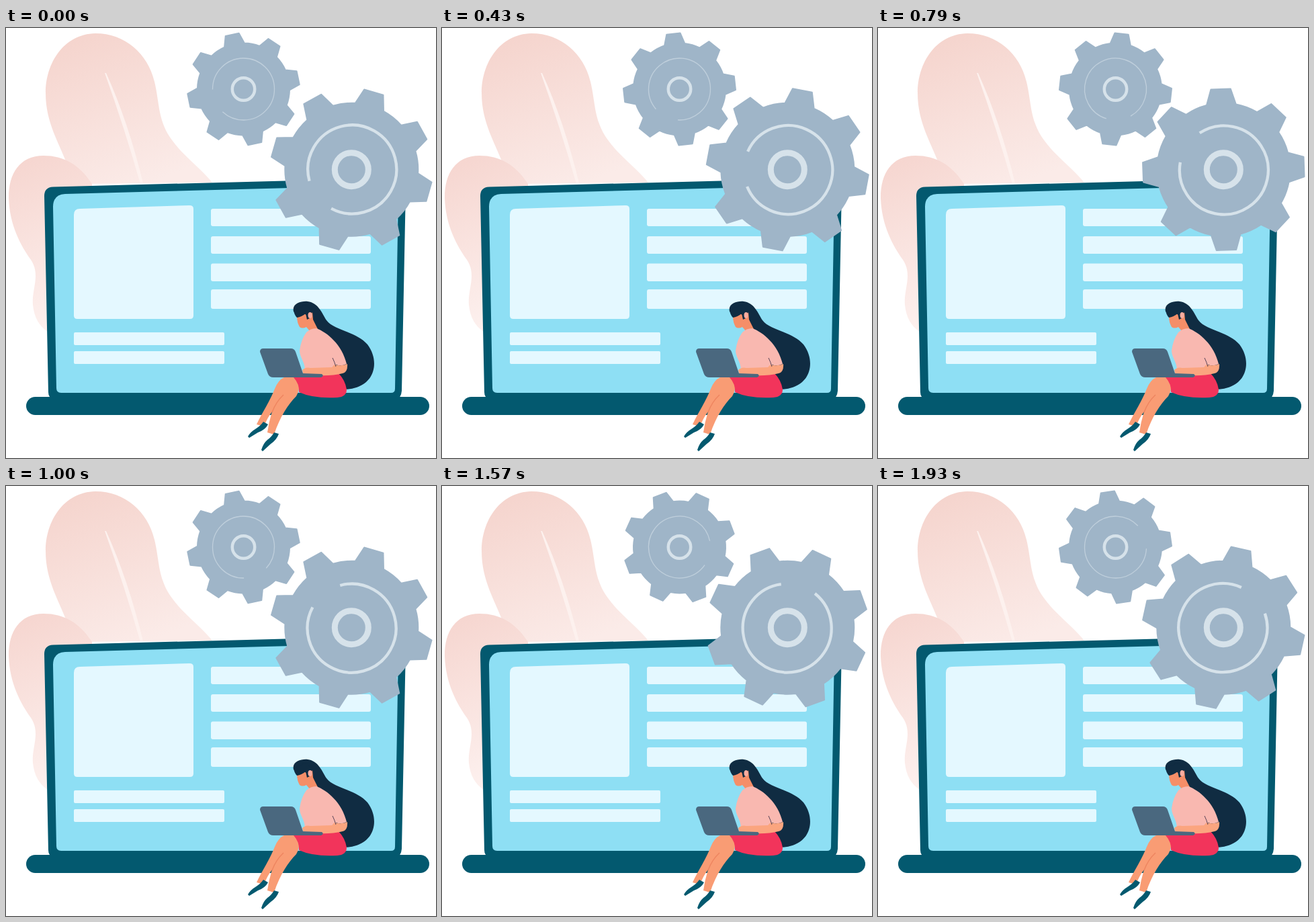
An HTML page for the animation above (2 s loop, 640 by 640 pixels).

```html
<!DOCTYPE html>
<html lang="en">
<head>
<meta charset="utf-8">
<title>Laptop and gears</title>
<style>
html, body { margin: 0; width: 100%; height: 100%; overflow: hidden; background: #fff; }
svg { display: block; width: 100vw; height: 100vh; }
.tooth { fill: #9fb5c8; stroke: #9fb5c8; stroke-linejoin: round; }
.ring { fill: none; stroke: #d6e2ea; }
</style>
</head>
<body>
<svg viewBox="0 0 640 640">
  <defs>
    <linearGradient id="tall" x1="0.2" y1="0" x2="0.6" y2="1">
      <stop offset="0" stop-color="#f5d4cd"/><stop offset="1" stop-color="#fbebe8"/>
    </linearGradient>
    <linearGradient id="low" x1="0.3" y1="0" x2="0.5" y2="1">
      <stop offset="0" stop-color="#f6d6d0"/><stop offset="1" stop-color="#fdf1ef"/>
    </linearGradient>
  </defs>

  <!-- leaves -->
  <path fill="url(#tall)" d="M307 230C288 206 262 190 243 161C226 134 228 108 221 80C211 38 177 8 133 8C86 9 59 52 59 97C59 142 80 172 92 206L122 232Z"/>
  <path fill="#fdf1ee" d="M147 67L149 67Q182 140 204 231L200 232Q176 148 147 67Z"/>
  <path fill="url(#low)" d="M128 232C109 203 86 190 56 190C20 190 4 217 4 252C5 293 22 324 37 345C52 368 38 388 40 412C42 431 49 443 62 452L130 440Z"/>

  <!-- big laptop -->
  <path fill="#03596f" d="M57 250Q57 237 70 236.5L582 223Q596 222 595 238L589 540Q588 552 580 552H72Q63 552 63 542Z"/>
  <rect x="30" y="549" width="600" height="27" rx="13.5" fill="#03596f"/>
  <path fill="#8edff4" d="M70 266Q70 248 88 247L574 234Q585 233 584 246L579 537Q579 543 573 543H82Q75 543 75 536Z"/>
  <g fill="#e4f8ff">
    <path d="M101 278Q101 269 110 269L273 264Q279 264 279 269V428Q279 433 274 433H106Q101 433 101 428Z"/>
    <rect x="305" y="269" width="238" height="26" rx="3"/>
    <rect x="305" y="310" width="238" height="26" rx="3"/>
    <rect x="305" y="350.5" width="238" height="26.5" rx="3"/>
    <rect x="305" y="389" width="238" height="29" rx="3"/>
    <rect x="101" y="453" width="224" height="19" rx="2"/>
    <rect x="101" y="481" width="224" height="19" rx="2"/>
  </g>

  <!-- woman -->
  <path fill="#102c42" d="M428 422C425 410 440 406 449 407C465 409 470 424 477 435C488 450 522 452 538 471C553 491 550 515 536 527C526 535 514 538 503 538L484 505L458 448L442 430Z"/>
  <path fill="#f58e68" d="M433 429L442 424L447 427L450 432L456 423L457 434L464 448L454 453L447 445Q441 448 437 445Q433 438 433 429Z"/>
  <path fill="#102c42" d="M428 420L446 412L456 421L452 432L448 434L446 425Q440 430 433 431Q429 427 428 420Z"/>
  <ellipse cx="452.5" cy="427.5" rx="3" ry="4.5" fill="#f9aca0"/>
  <path fill="#f99c74" d="M430 520L414 520Q405 524 400 537C393 555 381 573 373 590L384 593Q389 580 396 571Q391 587 389 602L399 605C408 578 420 560 432 548Q438 538 436 522Z"/>
  <path fill="none" stroke="#ee8560" stroke-width="1.5" d="M396 572Q402 556 413 546"/>
  <path fill="#03596f" d="M360 608Q364 601 371 597Q379 592 383 586L390 590Q386 598 375 602L362 610Z"/>
  <path fill="#03596f" d="M380 628Q383 618 389 613Q395 609 399 602L406 604Q403 613 394 619L382 630Z"/>
  <path fill="#f2345b" d="M428 520Q450 510 494 513Q505 524 507 538Q507 549 493 550Q458 552 436 542Q437 530 428 520Z"/>
  <path fill="#f9b8b0" d="M447 453Q453 447 462 447C478 453 500 471 507 500Q499 504 491 501L489 515L443 515C449 501 437 492 437 480Q439 464 447 453Z"/>
  <path fill="#fba57f" d="M441 509Q446 504 453 506L485 505L489 501Q499 504 508 500Q509 512 501 514Q484 518 465 517L442 514Z"/>
  <path fill="none" stroke="#5a4356" stroke-width="1" d="M486 491Q489 497 491 504"/>
  <path fill="#4a687f" d="M378 482Q378 477 383 477H424Q429 477 431 482L442 514L470 515Q474 518 469 520H398Q392 520 390 515Z"/>

  <g id="gears"></g>
</svg>
<script>
const gears = document.getElementById("gears");

const polar = (r, deg) => {
  const a = deg * Math.PI / 180;
  return (r * Math.sin(a)).toFixed(2) + " " + (-r * Math.cos(a)).toFixed(2);
};

// Eight tapered teeth on a round body; angles run clockwise from the top.
function outline(body, tip, phase) {
  let d = "";
  for (let i = 0; i < 8; i++) {
    const a = phase + i * 45;
    d += (i ? `A${body} ${body} 0 0 1 ` : "M") + polar(body, a - 12.8) +
      "L" + polar(tip, a - 7) + "L" + polar(tip, a + 7) + "L" + polar(body, a + 12.8);
  }
  return d + `A${body} ${body} 0 0 1 ${polar(body, phase - 12.8)}Z`;
}

function addGear(g) {
  const gapEnd = g.gap + 23.3 - 90;
  gears.insertAdjacentHTML("beforeend", `<g transform="translate(${g.x} ${g.y})"><g>
    <path class="tooth" stroke-width="2" d="${outline(g.body, g.tip, g.phase)}"/>
    <circle class="ring" cx="${g.shift}" r="${g.arc}" stroke-width="${g.line}" opacity="${g.alpha}"
      pathLength="360" stroke-dasharray="313.4 46.6" transform="rotate(${gapEnd})"/>
    </g><circle class="ring" r="${g.hub}" stroke-width="${g.rim}"/></g>`);
  return gears.lastElementChild.firstElementChild;
}

const small = addGear({ x: 353.5, y: 91, body: 68.5, tip: 83.5, phase: -11.7, gap: 246,
  shift: 0, arc: 46, line: 1.3, alpha: 0.6, hub: 16.7, rim: 4.5 });
const big = addGear({ x: 514.3, y: 210.7, body: 99, tip: 120.7, phase: 16, gap: 231.5,
  shift: -1, arc: 66, line: 4.3, alpha: 1, hub: 25, rim: 9 });

// 14 pictures a second, each taken from a 25 per second turn of 3.6 degrees.
function draw(now) {
  const tick = Math.floor((now % 2000) / 10);
  const step = Math.floor((tick + 0.5) * 0.14);
  const turn = 3.6 * Math.ceil(step * 25 / 14);
  big.setAttribute("transform", `rotate(${turn})`);
  small.setAttribute("transform", `rotate(${-turn})`);
  requestAnimationFrame(draw);
}
draw(0);
</script>
</body>
</html>
```
